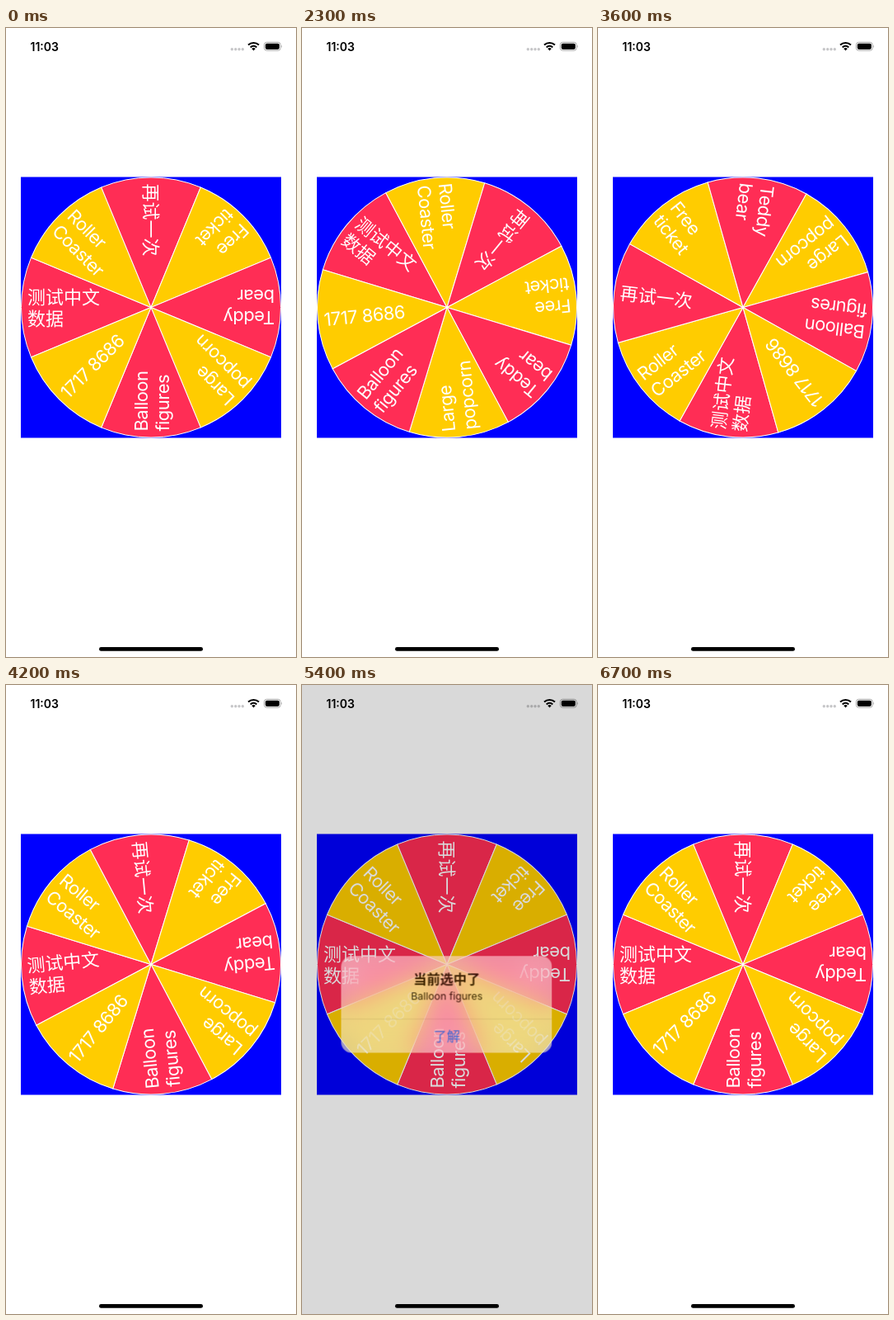
An HTML page that plays this animation: 352 by 762 pixels, repeating every 6800 ms.

```html
<!DOCTYPE html>
<html lang="zh-CN">
<head>
<meta charset="utf-8">
<title>Fortune wheel</title>
<style>
  html, body { margin: 0; width: 100%; height: 100%; overflow: hidden; background: #fff; }
  svg { display: block; font-family: Inter, "Noto Sans CJK SC", "Noto Sans CJK", sans-serif; }
  #stage, #dim { position: absolute; left: 0; top: 0; width: 352px; height: 762px; }
  #dim { background: #000; opacity: 0; }
  #alert {
    position: absolute; left: 49.3px; top: 328.5px; width: 253.4px; height: 116px;
    border-radius: 13px; overflow: hidden; opacity: 0;
    background: rgba(250, 250, 250, .69);
    backdrop-filter: blur(14px) saturate(1.3);
  }
  #wheel text { font-size: 22px; fill: #fff; }
  #wheel .latin { letter-spacing: -.025em; }
  #alert text { text-anchor: middle; }
</style>
</head>
<body>
<svg id="stage" viewBox="0 0 352 762">
  <text x="29.5" y="27.5" font-size="14" font-weight="600">11:03</text>
  <g fill="#c6c6c8">
    <circle cx="274.3" cy="25.7" r="1.7"/><circle cx="278.7" cy="25.7" r="1.7"/>
    <circle cx="283" cy="25.7" r="1.7"/><circle cx="287.3" cy="25.7" r="1.7"/>
  </g>
  <g transform="translate(300.5 27.5)" fill="none" stroke="#000" stroke-width="2.1">
    <path d="M-6.5 -6.9A9.5 9.5 0 0 1 6.5 -6.9M-3.8 -4.1A5.6 5.6 0 0 1 3.8 -4.1"/>
    <path d="M0 0L-2.3 -2.5A3.4 3.4 0 0 1 2.3 -2.5Z" fill="#000" stroke="none"/>
  </g>
  <rect x="313.4" y="17.3" width="19.8" height="10" rx="3" fill="none" stroke="#a6a6a6"/>
  <rect x="314.8" y="18.7" width="17" height="7.2" rx="1.8"/>
  <path d="M334.4 20.6Q336 22.3 334.4 24Z" fill="#a6a6a6"/>

  <rect x="18" y="180.5" width="316" height="316" fill="#00f"/>
  <g transform="translate(176 338.5)"><g id="wheel"></g></g>

  <rect x="113" y="750" width="126" height="4.8" rx="2.4"/>
</svg>
<div id="dim"></div>
<div id="alert">
  <svg width="253.4" height="116">
    <text x="126.7" y="34" font-size="16" font-weight="600">当前选中了</text>
    <text x="126.7" y="52.5" font-size="12.2">Balloon figures</text>
    <path d="M0 75.4H253.4" stroke="#3c3c43" stroke-opacity=".22" stroke-width=".7"/>
    <text x="126.7" y="102" font-size="16" fill="#007aff">了解</text>
  </svg>
</div>
<script>
  const LOOP = 6800, STEP = 100;
  const SPIN = { start: 2268, length: 2967, degrees: 360 * 6 };
  const ALERT_IN = 5285, ALERT_OUT = 6285;
  const RADIUS = 157.5;

  // Clockwise, starting with the slice on the left
  const prizes = [
    ['测试中文', '数据'], ['Roller', 'Coaster'], ['再试一次'], ['Free', 'ticket'],
    ['Teddy', 'bear'], ['Large', 'popcorn'], ['Balloon', 'figures'], ['1717 8686']
  ];

  const byId = id => document.getElementById(id);
  const wheel = byId('wheel'), dim = byId('dim'), alertBox = byId('alert');

  const half = Math.PI / 8;
  const edgeX = -RADIUS * Math.cos(half), edgeY = RADIUS * Math.sin(half);
  const slice = `M0 0L${edgeX} ${edgeY}A${RADIUS} ${RADIUS} 0 0 1 ${edgeX} ${-edgeY}Z`;

  wheel.innerHTML = prizes.map((lines, i) => {
    const baselines = lines.length > 1 ? [-4.5, 21.5] : [8];
    const kind = /[a-z0-9]/i.test(lines[0]) ? 'latin' : 'han';
    const label = lines.map((line, n) =>
      `<text class="${kind}" x="-150" y="${baselines[n]}">${line}</text>`).join('');
    const color = i % 2 ? '#ffcc00' : '#ff2d55';
    return `<g transform="rotate(${i * 45})">
      <path d="${slice}" fill="${color}" stroke="#fff" stroke-width="1"/>${label}</g>`;
  }).join('');

  // cubic-bezier(0, 0, .58, 1)
  function easeOut(x) {
    if (x <= 0) return 0;
    if (x >= 1) return 1;
    let low = 0, high = 1;
    for (let i = 0; i < 24; i++) {
      const u = (low + high) / 2;
      if (1.74 * u * u * (1 - u) + u ** 3 < x) low = u; else high = u;
    }
    return low * low * (3 - 2 * low);
  }

  // Critically damped spring from 0 to 1
  function spring(ms) {
    const w = Math.max(0, ms) * .0228;
    return 1 - (1 + w) * Math.exp(-w);
  }

  function render(t) {
    const angle = SPIN.degrees * easeOut((t - SPIN.start) / SPIN.length);
    wheel.setAttribute('transform', `rotate(${angle % 360})`);

    const leaving = t >= ALERT_OUT;
    let shown = leaving ? 1 - spring(t - ALERT_OUT) : spring(t - ALERT_IN);
    if (shown < .002) shown = 0;
    dim.style.opacity = .2 * shown;
    alertBox.style.opacity = shown;
    alertBox.style.transform = `scale(${leaving ? 1 : 1 + .045 * (1 - shown)})`;
  }

  // The picture advances ten times a second; the lead absorbs display latency
  const begin = performance.now(), LEAD = 16;
  function tick() {
    const elapsed = performance.now() - begin + LEAD;
    render(Math.floor(elapsed / STEP) * STEP % LOOP);
    requestAnimationFrame(tick);
  }
  tick();
</script>
</body>
</html>
```
